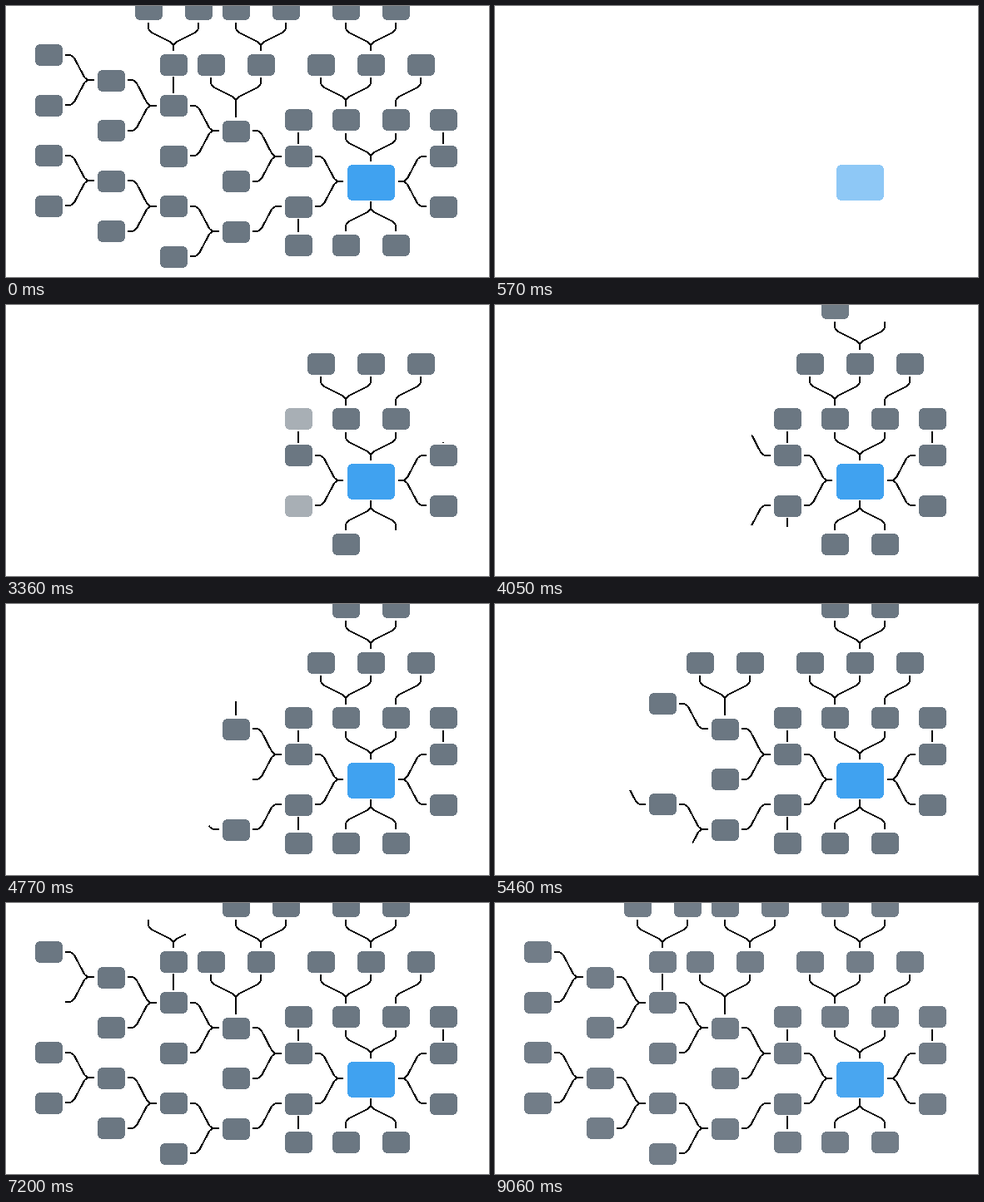
An HTML page that plays this animation: 580x326 px, repeating every 9.09 s.

```html
<!DOCTYPE html>
<html lang="en">
<head>
<meta charset="utf-8">
<title>Growing mind map</title>
<style>
  html, body { margin: 0; height: 100%; overflow: hidden; background: #fff; }
  svg { display: block; width: 580px; height: 326px; shape-rendering: crispEdges; }
  path { fill: none; stroke: #000; stroke-width: 2; }
</style>
</head>
<body>
<svg viewBox="0 0 580 326"><g id="map"></g></svg>
<script>
const LOOP = 9090, STEP = 30, FADE_OUT = 360;
const FIRST = 540, BEAT = 930, POP = 90, PAUSE = 70;
const COLUMN = 74.8, ROW = 66.5, TOP_ROW = 3.8, BOTTOM_ROW = 287.4;
const map = document.getElementById('map');
const parts = [];

// A node appears one beat after its parent, plus an optional wait in beats.
// Directions: main way first (l, r, u, d), then the way the branch bends.
const node = (dir, wait = 0, ...children) => ({ dir, wait, children });

const root = { x: 438, y: 211, beat: 0, children: [
  node('lu', 0,
    node('u', 1),
    node('ld', 2.6),
    node('lu', 2,
      node('ul'),
      node('ur', 0, node('ur'), node('ul', .1)),
      node('ld', 1),
      node('lu', .2,
        node('lu', -.2, node('lu'), node('ld', .2)),
        node('ld', -.1),
        node('u', 0, node('ul'), node('ur', .3))))),
  node('ul', 0,
    node('ul', .3),
    node('ur', .7, node('ul'), node('ur', .1))),
  node('ur', 0, node('ur', .7)),
  node('rd'),
  node('dl'),
  node('ru', .8, node('u', .8)),
  node('ld', 2,
    node('d'),
    node('ld', 0,
      node('ld', .6),
      node('lu', 0,
        node('ld', .1),
        node('lu', -.4, node('ld', -.4), node('lu', .2))))),
  node('dr', 2.1)
] };

const isSideways = dir => 'lr'.includes(dir[0]);

// Nearest shared row at least 40 px above
const rowAbove = y => TOP_ROW + ROW * Math.floor((y - 40 - TOP_ROW) / ROW);

function place(child, parent) {
  const { dir } = child;
  if (isSideways(dir)) {
    const reach = COLUMN + (parent === root ? 12.5 : 0);
    child.x = parent.x + (dir[0] === 'l' ? -reach : reach);
    child.y = parent.y + (dir[1] === 'u' ? -30.5 : 30);
  } else {
    child.x = parent.x + (dir[1] === 'l' ? -30 : dir[1] === 'r' ? 30 : 0);
    child.y = dir[0] === 'u' ? rowAbove(parent.y) : BOTTOM_ROW;
  }
  child.beat = parent.beat + 1 + child.wait;
}

function add(tag, attrs) {
  const el = document.createElementNS('http://www.w3.org/2000/svg', tag);
  for (const key in attrs) el.setAttribute(key, attrs[key]);
  return map.appendChild(el);
}

// Polyline with rounded corners
function rounded(points, r = 5) {
  let d = 'M' + points[0];
  for (let i = 1; i < points.length - 1; i++) {
    const p = points[i];
    const toward = q => {
      const k = Math.min(r / Math.hypot(q[0] - p[0], q[1] - p[1]), 1);
      return [p[0] + (q[0] - p[0]) * k, p[1] + (q[1] - p[1]) * k];
    };
    d += `L${toward(points[i - 1])}Q${p} ${toward(points[i + 1])}`;
  }
  return d + 'L' + points[points.length - 1];
}

function edge(parent, child) {
  const x0 = Math.round(parent.x), x1 = Math.round(child.x);
  const y0 = Math.round(parent.y), y1 = Math.round(child.y);
  const sx = Math.sign(x0 - x1), sy = Math.sign(y0 - y1);
  const fromRoot = parent === root;
  if (isSideways(child.dir)) {
    return rounded([[x0 - (fromRoot ? 33 : 20) * sx, y0],
      [x1 + 45 * sx, y0], [x1 + 29 * sx, y1], [x1 + 20 * sx, y1]]);
  }
  if (x0 === x1) return rounded([[x0, y0 - 15 * sy], [x1, y1 + 15 * sy]]);
  return rounded([[x0, y0 - (fromRoot ? 24 : 16) * sy],
    [x0, y1 + 41 * sy], [x1, y1 + 26 * sy], [x1, y1 + 16 * sy]]);
}

function build(item, parent) {
  let line = null;
  if (parent) {
    place(item, parent);
    line = add('path', { d: edge(parent, item), pathLength: 1 });
  }
  const w = parent ? 33 : 57, h = parent ? 26 : 43;
  const box = add('rect', {
    x: Math.round(item.x - (w - 1) / 2),
    y: Math.round(item.y - (parent ? 12.5 : 20)),
    width: w, height: h, rx: 6,
    fill: parent ? '#6b7782' : '#40a2f0'
  });
  const grow = item.beat < 2 ? 800 : 480;
  parts.push({ line, box, grow, start: FIRST + BEAT * item.beat });
  item.children.forEach(child => build(child, item));
}

const clamp = v => Math.max(0, Math.min(1, v));

function draw(now) {
  const t = Math.floor(now % LOOP / STEP) * STEP;
  const fading = t <= FADE_OUT;
  const time = fading ? LOOP : t;
  map.setAttribute('opacity', fading ? 1 - t / FADE_OUT : 1 - Math.max(0, t - 9030) / 600);
  for (const { line, box, start, grow } of parts) {
    box.setAttribute('opacity', 1 - (1 - clamp((time - start) / POP)) ** 2.2);
    if (!line) continue;
    const p = clamp((time - start + PAUSE + grow) / grow);
    line.setAttribute('visibility', p > 0 ? 'visible' : 'hidden');
    line.setAttribute('stroke-dasharray', p < 1 ? `${p} 2` : 'none');
  }
}

build(root);
const begin = performance.now();
function tick() {
  draw(performance.now() - begin);
  requestAnimationFrame(tick);
}
tick();
</script>
</body>
</html>
```
